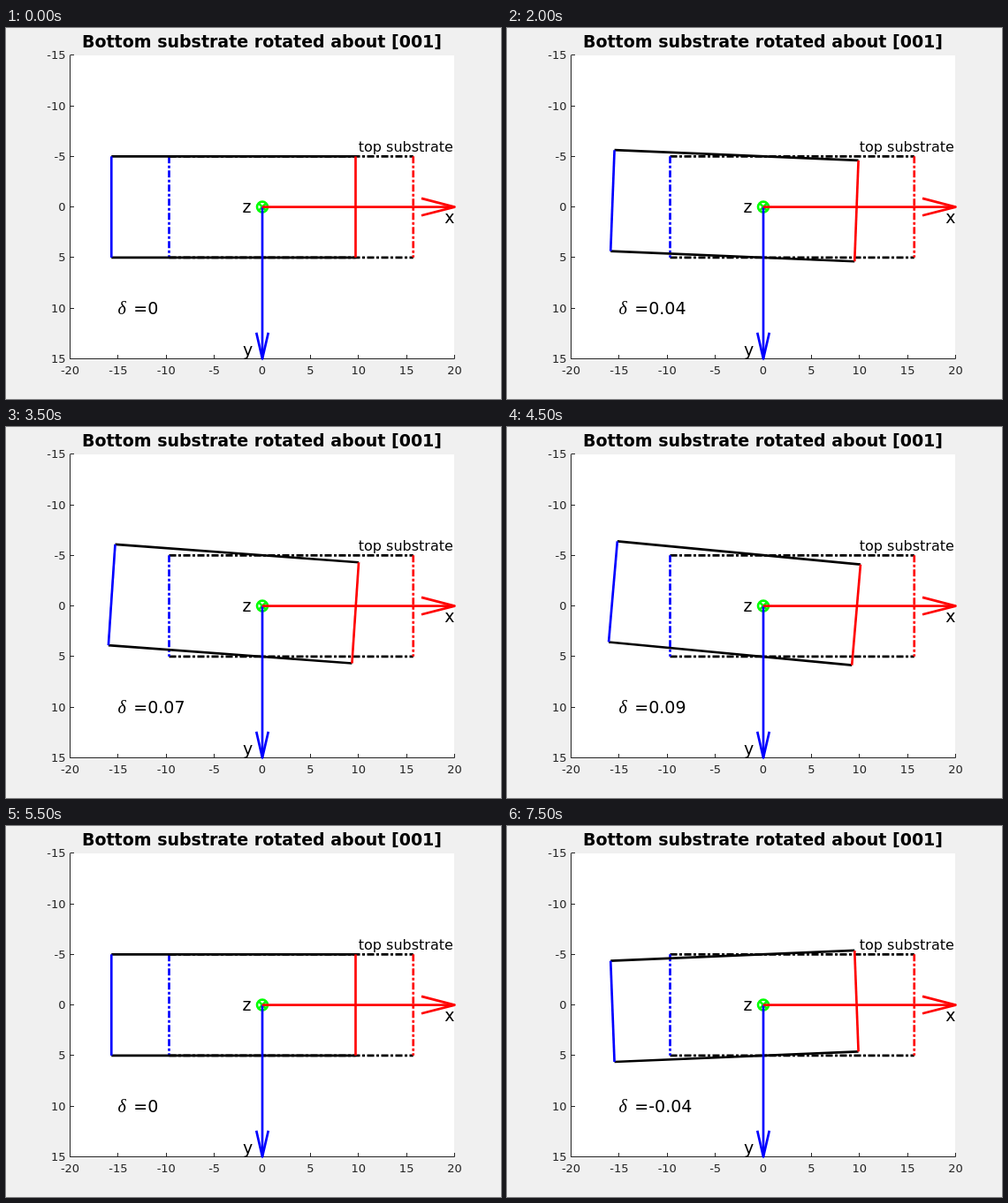
An HTML page with a canvas that plays this animation: 560 px wide and 420 px high, repeating every 8000 ms.

```html
<!DOCTYPE html>
<html lang="en">
<head>
<meta charset="utf-8">
<title>Rotated substrate</title>
<style>
html, body { margin: 0; width: 100%; height: 100%; overflow: hidden; background: #f0f0f0; }
canvas { display: block; width: 560px; height: 420px; }
</style>
</head>
<body>
<canvas id="stage" width="560" height="420"></canvas>
<script>
const ctx = document.getElementById('stage').getContext('2d');
const STEP = 500, STEPS = 16, RESET = 11;
const LONG = 15.7, SHORT = 9.7, HALF = 5;
const RED = '#f00', BLUE = '#00f', BLACK = '#000', GREEN = '#0f0', AXIS = '#262626';
const SANS = '"DejaVu Sans", sans-serif';

const px = x => 290 + x * 10.875;
const py = y => 202.6 + y * 11.45;

function path(points, color, width = 2.67, dash = []) {
  ctx.strokeStyle = color;
  ctx.lineWidth = width;
  ctx.setLineDash(dash);
  ctx.beginPath();
  points.forEach(([x, y]) => ctx.lineTo(x, y));
  ctx.stroke();
  ctx.setLineDash([]);
}

function text(str, x, y, size, { align = 'left', color = BLACK, style = '', family = SANS } = {}) {
  ctx.font = `${style} ${size}px ${family}`;
  ctx.textAlign = align;
  ctx.fillStyle = color;
  ctx.fillText(str, x, y);
}

function axes() {
  ctx.fillStyle = '#f0f0f0';
  ctx.fillRect(0, 0, 560, 420);
  ctx.fillStyle = '#fff';
  ctx.fillRect(73, 31, 434, 343);
  path([[72.5, 31], [72.5, 374.5], [507.5, 374.5]], AXIS, 1);
  for (let v = -20; v <= 20; v += 5) {
    const x = Math.floor(px(v)) + 0.5;
    path([[x, 374.5], [x, 370]], AXIS, 1);
    text(v, px(v), 392, 13, { align: 'center', color: AXIS });
    if (Math.abs(v) > 15) continue;
    const y = Math.floor(py(v)) + 0.5;
    path([[72.5, y], [77, y]], AXIS, 1);
    text(v, 67.5, y + 4.7, 13, { align: 'right', color: AXIS });
  }
  text('Bottom substrate rotated about [001]', 289.5, 22, 19, { align: 'center', style: 'bold' });
}

// Rectangle in data units, turned about the origin
function substrate(left, right, angle, dash) {
  const c = Math.cos(angle), s = Math.sin(angle);
  const at = (x, y) => [px(x * c - y * s), py(x * s + y * c)];
  const tl = at(left, -HALF), tr = at(right, -HALF);
  const bl = at(left, HALF), br = at(right, HALF);
  path([tl, tr], BLACK, 2.67, dash);
  path([bl, br], BLACK, 2.67, dash);
  path([tl, bl], BLUE, 2.67, dash);
  path([tr, br], RED, 2.67, dash);
}

function marker(x, y) {
  const r = 4.5;
  path([[x - r, y - r], [x + r, y + r]], GREEN);
  path([[x - r, y + r], [x + r, y - r]], GREEN);
  ctx.beginPath();
  ctx.arc(x, y, 6, 0, Math.PI * 2);
  ctx.stroke();
}

function arrows() {
  const x = px(0), y = py(0), tipX = px(20), tipY = py(15);
  path([[x, y], [x, tipY]], BLUE);
  path([[x - 6.8, tipY - 29.5], [x, tipY], [x + 6.8, tipY - 29.5]], BLUE);
  path([[x, y], [tipX, y]], RED);
  path([[tipX - 37.5, y - 9.7], [tipX, y], [tipX - 37.5, y + 9.7]], RED);
}

function draw(time) {
  const n = Math.floor(time / STEP) % STEPS;
  const delta = (n < RESET ? n : RESET - n) / 100;
  ctx.lineJoin = 'round';
  axes();
  substrate(-SHORT, LONG, 0, [8, 2.5, 3, 2.5]);
  substrate(-LONG, SHORT, delta, []);
  marker(px(0), py(0));
  arrows();
  text('top substrate', 398.75, 140, 16);
  text('x', 496.3, 221, 19);
  text('y', 268, 371, 19);
  text('z', 267.5, 209, 19);
  text('δ', 126.5, 324, 20, { style: 'italic', family: '"Liberation Serif", serif' });
  text('=' + (delta || 0), 144.3, 324, 19);
}

let start;
function frame(now) {
  start ??= now;
  draw(now - start);
  requestAnimationFrame(frame);
}
draw(0);
requestAnimationFrame(frame);
</script>
</body>
</html>
```
